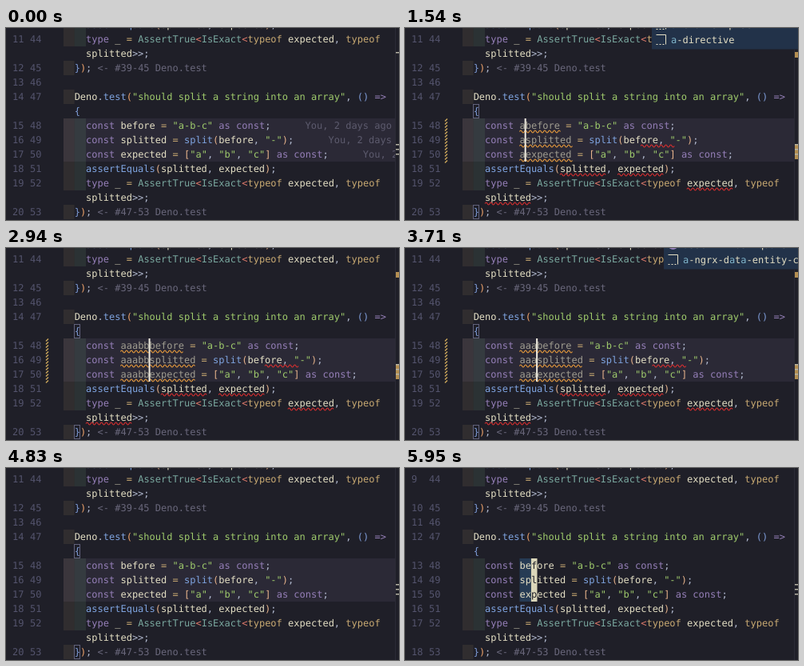
Write an HTML page that moves like this. It is 492 px wide and 240 px high and loops after 6.02 s.

```html
<!DOCTYPE html>
<html>
<head>
<meta charset="utf-8">
<style>
html, body { margin: 0; width: 100%; height: 100%; overflow: hidden; background: #1f1f28; }
svg { display: block; width: 492px; height: 240px; }
text { font: 12px "DejaVu Sans Mono", monospace; white-space: pre; text-rendering: geometricPrecision; }
</style>
</head>
<body>
<svg id="stage" viewBox="0 0 492 240"></svg>
<script>
const LOOP = 6020, CH = 7.224, X0 = 71.2;
const BG = '#1f1f28', FG = '#e4dfc4', DIM = '#6a687c', NUM = '#54546d';
const BRACKETS = ['#f0a46c', '#7e9cd8', '#e8b48c'];
const NAMES = ['before', 'splitted', 'expected'];
const svg = document.getElementById('stage');

const colX = c => X0 + c * CH;
const rowY = r => 5 + r * 18;
const esc = s => s.replace(/&/g, '&amp;').replace(/</g, '&lt;').replace(/>/g, '&gt;');
const rect = (x, y, w, h, fill, more = '') =>
  `<rect x="${x}" y="${y}" width="${w}" height="${h}" fill="${fill}" ${more}/>`;
const label = (x, y, s, fill) => `<text x="${x}" y="${y}" fill="${fill}">${s}</text>`;
const span = (s, fill) => `<tspan fill="${fill}">${esc(s)}</tspan>`;

// Syntax colours, first match wins
const RULES = [
  [/^"/, '#9fcb6c'],
  [/^(const|type|as|=>)$/, '#957fb8'],
  [/^(typeof|=)$/, '#c8a972'],
  [/^</, '#e07a6c'],
  [/^(AssertTrue|IsExact)$/, '#7aa89f'],
  [/^(test|split|assertEquals)$/, '#7fa4e0'],
  [/^[.,;>]+$/, '#b4bcd2']
];

// Brackets are coloured by nesting depth
function paint(code, faded) {
  let depth = code.startsWith('Deno') ? 0 : code === '{' ? 1 : 2;
  return code.match(/"[^"]*"|\w+|[=<>]+|\s+|./g).map(tok => {
    if (/^[([{]$/.test(tok)) return span(tok, BRACKETS[depth++]);
    if (/^[)\]}]$/.test(tok)) return span(tok, BRACKETS[code[0] === '}' ? --depth : --depth]);
    const rule = RULES.find(([re]) => re.test(tok));
    return span(tok, tok === faded ? '#a09d90' : rule ? rule[1] : FG);
  }).join('');
}

function squiggle(c, r, len, color) {
  const n = Math.round(len * CH / 3);
  return `<path d="M${colX(c)} ${rowY(r) + 16.5}q1.5 -3 3 0${' t3 0'.repeat(n - 1)}" fill="none" stroke="${color}" stroke-width="1.1"/>`;
}

// Rows: [row, column, code, line number, trailing hint]
function rows(typed) {
  const assert = 'assertEquals(splitted, expected);';
  const type = 'type _ = AssertTrue<IsExact<typeof expected, typeof';
  return [
    [-1, 4, assert],
    [0, 4, type, 44],
    [1, 4, 'splitted>>;'],
    [2, 2, '});', 45, ' <- #39-45 Deno.test'],
    [3, 0, '', 46],
    [4, 2, 'Deno.test("should split a string into an array", () =>', 47],
    [5, 2, '{'],
    [6, 4, `const ${typed}before = "a-b-c" as const;`, 48],
    [7, 4, `const ${typed}splitted = split(before, "-");`, 49],
    [8, 4, `const ${typed}expected = ["a", "b", "c"] as const;`, 50],
    [9, 4, assert, 51],
    [10, 4, type, 52],
    [11, 4, 'splitted>>;'],
    [12, 2, '});', 53, ' <- #47-53 Deno.test']
  ];
}

function state(t) {
  const at = times => times.filter(x => t >= x).length;
  const n = at([1260, 1680, 2030, 2520, 2940]) - at([3500, 3710, 3850, 4130, 4340]);
  const insert = t < 5530;
  return {
    n, insert,
    shift: insert ? 11 : t < 5950 ? 10 : 9,
    pick: at([5740, 5950]),
    blame: t < 1260,
    brackets: t >= 420 && insert,
    caret: insert && (t >= 420 && t < 910 || t >= 1260 && t < 4830 || t >= 5390),
    gutter: t >= 1470 && t < 4550,
    errors: t >= 1540 && t < 4480,
    list: t >= 1330 && n > 0 && n < 4,
    back: t >= 3500
  };
}

function indents() {
  let out = '';
  for (const r of [-1, 0, 2, 4, 6, 7, 8, 9, 10, 12]) {
    out += rect(72, rowY(r), 13.6, 18, '#c0a36e', 'opacity=".1"');
    if (r !== 2 && r !== 4 && r !== 12) out += rect(85.6, rowY(r), 14.5, 18, '#7fb080', 'opacity=".13"');
  }
  return out;
}

function suggestions(s) {
  const items = [
    ['a-ctor-skip-self', 'a-directive'],
    ['a-guard-can-load', 'a-trackby'],
    [s.back ? 'assertAlmostEquals' : 'a-guard-can-match', 'a-ngrx-data-entity-collection']
  ][s.n - 1];
  const x = s.n < 3 ? 309 : 324;
  let out = rect(x, -2, 200, 28.5, '#223249');
  items.forEach((item, i) => {
    const y = i * 19;
    let left = s.n;
    const text = [...item].map(c => span(c, c === 'a' && left-- > 0 ? '#7fb4ca' : FG)).join('');
    out += item.startsWith('assert')
      ? `<circle cx="${x + 11.5}" cy="${y - 4}" r="6" fill="#957fb8"/>`
      : rect(x + 5.5, y - 10.5, 12, 12, 'none', `stroke="${FG}" stroke-dasharray="24 2 2 2 2 2 2 12"`);
    out += `<text x="${x + 24}" y="${y}">${text}</text>`;
  });
  return out;
}

function draw(s) {
  const typed = 'aaabb'.slice(0, s.n);
  let out = s.insert ? rect(72, 113, 415, 54, '#2b2936') : '';
  out += indents();

  if (!s.insert) {
    out += rect(colX(10), 113, s.pick * CH, 54, '#263b54');
    out += rect(colX(10 + s.pick), 113, CH + .4, 54, '#dcd7ba');
  }
  if (s.brackets)
    for (const r of [5, 12]) out += rect(85.5, rowY(r) + .5, 7, 17, 'none', 'stroke="#62627c"');

  for (const [r, c, code, line, hint] of rows(typed)) {
    const y = rowY(r) + 13, edited = r > 5 && r < 9, name = NAMES[r - 6];
    if (line) out += label(8, y, line - 44 + s.shift, NUM) + label(30, y, line, NUM);
    if (code) {
      const faded = s.errors && edited ? typed + name : '';
      out += `<text x="${colX(c)}" y="${y}">${paint(code, faded)}${hint ? span(hint, DIM) : ''}</text>`;
    }
    if (!edited) continue;
    if (s.blame) out += label(colX(c + code.length + 6), y, 'You, 2 days ago', '#5d5b6e');
    if (!s.insert) out += label(colX(10 + s.pick), y, name[s.pick], BG);
    if (s.errors) out += squiggle(10, r, s.n + name.length, '#f0a03c');
  }

  if (s.errors) {
    const red = '#e03030';
    out += squiggle(30 + s.n, 7, 6, red) + squiggle(17, 9, 8, red) + squiggle(27, 9, 8, red)
      + squiggle(39, 10, 8, red) + squiggle(4, 11, 8, red);
  }
  if (s.gutter) {
    let d = '';
    for (let y = 113; y < 167; y += 4) d += `M50 ${y + 3.5}l3 -3`;
    out += `<path d="${d}" stroke="#c8a55a" stroke-width="1.5"/>`;
  }
  if (s.caret) out += rect(colX(10 + s.n) - 1, 113, 2, 54, '#f0ece0');
  if (s.list) out += suggestions(s);

  // Overview ruler
  const y0 = s.list ? 27 : 0;
  out += rect(487, y0, 5, 240, BG) + rect(487, y0, 1, 240, '#2b2b36');
  if (s.gutter) out += rect(488, 30, 4, 7, '#b58f52') + rect(488, 145, 4, 19, '#b58f52');
  else if (s.blame) out += rect(488, 30, 4, 1.5, '#b8b5a6');
  for (const y of [145, 151, 157]) out += rect(488, y, 4, 1.5, '#b8b5a6');
  return out;
}

let last = '';
function tick() {
  const s = state(performance.now() % LOOP), key = JSON.stringify(s);
  if (key !== last) {
    svg.innerHTML = draw(s);
    last = key;
  }
  requestAnimationFrame(tick);
}
tick();
</script>
</body>
</html>
```
